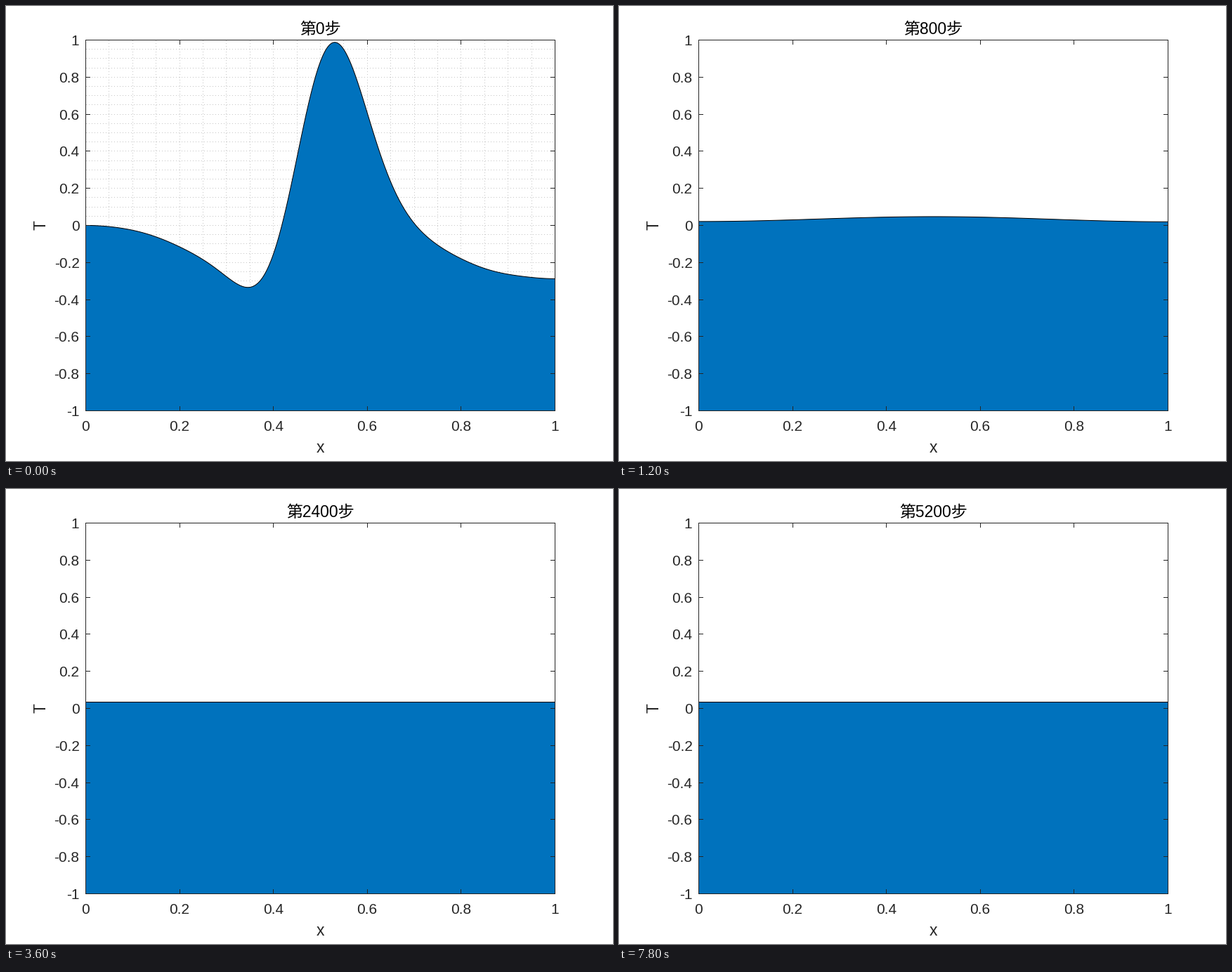
These frames come from a looping animation (864 by 648 pixels, 8000 ms). A matplotlib script:

```python
import matplotlib.pyplot as plt
import numpy as np
from matplotlib.animation import FuncAnimation

W, H, DPI = 864, 648, 100
LEFT, RIGHT, TOP, BOTTOM = 113.5, 781.5, 48.5, 576.5
PX = 72 / DPI
INK, BLUE, GRID = "#262626", "#0072BD", "#C6C6C6"
INTERVAL, FRAMES = 100, 80
FRAMES_PER_UPDATE, STEPS_PER_UPDATE = 3, 200

plt.rcParams["font.family"] = ["Liberation Sans", "Noto Sans CJK JP"]
plt.rcParams["axes.unicode_minus"] = False

# Starting temperature at every 0.05, with extra points on the steep flank
START_X = np.append(np.linspace(0, 1, 21), [0.37, 0.425, 0.475, 0.53, 0.56])
START_T = [0, -.006, -.026, -.062, -.115, -.185, -.276, -.332, -.155, .36,
           .885, .945, .605, .235, .01, -.105, -.18, -.232, -.263, -.281,
           -.287, -.305, .08, .66, .988, .905]
# Cosine amplitudes after the first update, and the decay of mode 1 per update
WARM_MODES = np.array([.034, .001, -.148, .038, .012])
DECAY = 0.1996

grid_x = np.linspace(0, 1, 401)


def cosines(x, count):
    return np.cos(np.pi * np.outer(x, np.arange(count)))


START_MODES = np.linalg.lstsq(cosines(START_X, 16), START_T, rcond=None)[0]


def temperature(update):
    if update == 0:
        modes = START_MODES
    else:
        n = np.arange(len(WARM_MODES))
        modes = WARM_MODES * np.exp(-DECAY * n ** 2 * (update - 1))
    return cosines(grid_x, len(modes)) @ modes


def to_px(x):
    return LEFT + (RIGHT - LEFT) * x


def to_py(t):
    return BOTTOM - (BOTTOM - TOP) * (t + 1) / 2


def crisp(v):
    return np.floor(v) + 0.5


fig = plt.figure(figsize=(W / DPI, H / DPI), dpi=DPI, facecolor="white")
ax = fig.add_axes([0, 0, 1, 1])
ax.set_xlim(0, W)
ax.set_ylim(H, 0)
ax.axis("off")


# Coordinates already sit on pixel centres, so snapping stays off
def line(xs, ys, color=INK, z=4, **style):
    return ax.plot(xs, ys, color=color, lw=PX, zorder=z, snap=False,
                   solid_capstyle="projecting", solid_joinstyle="miter",
                   dash_capstyle="butt", **style)[0]


def label(x, y, text, size=20.83, color=INK, **style):
    style = {"ha": "center", "va": "baseline", **style}
    return ax.text(x, y, text, fontsize=size * PX, color=color, **style)


dots = {"color": GRID, "z": 1, "linestyle": (0, (1, 3))}
grid_lines = [line([crisp(to_px(x))] * 2, [TOP + 0.5, BOTTOM], **dots)
              for x in np.arange(1, 20) / 20]
grid_lines += [line([LEFT + 0.5, RIGHT], [crisp(to_py(t))] * 2, **dots)
               for t in np.arange(-19, 20) / 20]

area = ax.fill([0], [0], facecolor=BLUE, edgecolor="black", lw=PX,
               zorder=2, snap=False)[0]

line([LEFT, RIGHT, RIGHT, LEFT, LEFT], [TOP, TOP, BOTTOM, BOTTOM, TOP])
TICK = 6
for x in np.arange(6) / 5:
    px = crisp(to_px(x))
    line([px, px], [TOP, TOP + TICK])
    line([px, px], [BOTTOM, BOTTOM - TICK])
    label(to_px(x) - 0.5, 605, f"{x:g}")
for t in np.arange(-5, 6) / 5:
    py = crisp(to_py(t))
    line([LEFT, LEFT + TICK], [py, py])
    line([RIGHT, RIGHT - TICK], [py, py])
    label(104.5, to_py(t) + 7.5, f"{t:g}", ha="right")

label(447, 636.5, "x", 22.9)
label(56.5, 312.5, "T", 22.9, rotation=90, rotation_mode="anchor")
title = label(447.5, 39.5, "", 22.9, "black")


def draw(frame):
    update = frame // FRAMES_PER_UPDATE
    xs = np.concatenate([[LEFT], to_px(grid_x), [RIGHT]])
    ys = np.concatenate([[BOTTOM], to_py(temperature(update)), [BOTTOM]])
    area.set_xy(np.column_stack([xs, ys]))
    title.set_text(f"第{update * STEPS_PER_UPDATE}步")
    for item in grid_lines:
        item.set_visible(update == 0)
    return [area, title, *grid_lines]


anim = FuncAnimation(fig, draw, frames=FRAMES, interval=INTERVAL,
                     init_func=lambda: draw(0), repeat=True, repeat_delay=0)
plt.show()
```
